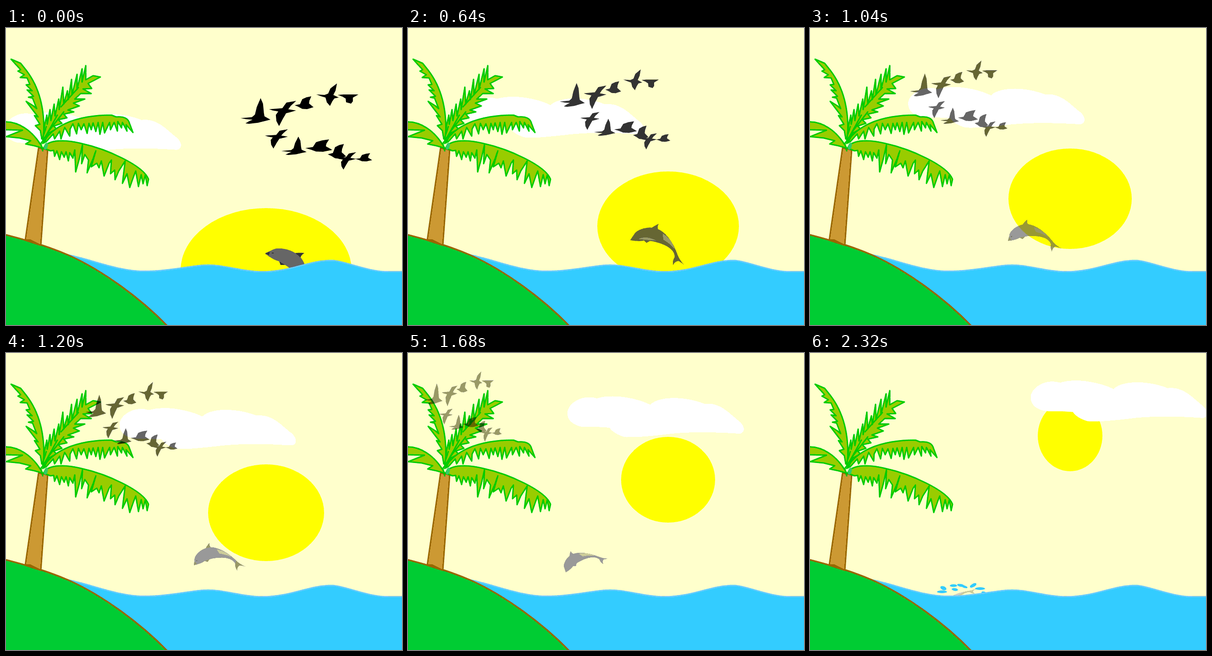
An HTML page with a canvas for the animation above (2400 ms loop, 864x648 px).

```html
<!DOCTYPE html>
<html lang="en">
<head>
<meta charset="utf-8">
<title>Island sunrise</title>
<style>
html, body { margin: 0; width: 100%; height: 100%; overflow: hidden; background: #ffc; }
canvas { display: block; width: 864px; height: 648px; }
</style>
</head>
<body>
<canvas id="stage" width="864" height="648"></canvas>
<script>
const W = 864, H = 648, STEP = 80, STEPS = 30;
const ctx = document.getElementById('stage').getContext('2d', { willReadFrequently: true });
const P = d => new Path2D(d);

function paint(c, path, fill, stroke, width) {
  if (fill) { c.fillStyle = fill; c.fill(path); }
  if (stroke) {
    c.strokeStyle = stroke;
    c.lineWidth = width;
    c.lineJoin = c.lineCap = 'round';
    c.stroke(path);
  }
}

const cloud = P('M281 148C281 128 312 106 345 116C378 106 430 114 462 130C475 114 530 108 580 128' +
  'C615 124 635 150 656 166C672 180 666 193 656 193C600 189 540 189 500 194C460 199 420 202 405 200' +
  'C390 196 378 188 373 180C340 177 320 180 308 177C290 172 281 162 281 148Z');

const surface = 'M135 495C190 506 245 531 305 531C350 531 400 520 425 518C470 513 510 532 560 532' +
  'C620 532 660 507 712 507C745 510 790 532 835 532L870 532';
const sea = P(surface + 'L870 660L100 660Z');
const seaLine = P(surface);

const slope = 'M-5 450C45 463 85 474 135 495C210 528 295 591 352 650';
const hill = P(slope + 'L-5 660Z');
const hillLine = P(slope);

const trunk = P('M71 262L91 266L76 474L54 463L42 463Z');
const trunkFoot = P('M42 463L54 467L76 474');

const fronds = [
  // left
  'M-5 205C25 203 58 222 80 262L62 257L43 253L54 246L30 240L0 237L36 223L-5 222',
  // upper left
  'M11 68L32 77L44 92C72 128 86 175 82 240L78 242L75 224L64 213L74 210L62 191L70 194L44 160L60 170' +
  'L67 176L58 153L49 151L60 149L46 135L57 137L44 124L52 123L46 109L31 108L40 102L26 94L32 91L20 78Z',
  // upper right
  'M80 244L84 214L89 190L90 210L96 178L98 202L105 166L107 192L115 155L116 178L124 129L126 166L134 137' +
  'L136 156L143 112L144 146L155 101L155 134L166 89L166 118L174 82L174 113L190 104L206 107L179 121' +
  'L187 132L168 133L186 143L163 143L150 155L172 155L147 164L160 170L135 179L148 183L126 188' +
  'L133 196L114 200L122 208L104 214L110 220L94 229Z',
  // middle right
  'M80 252C100 215 150 190 230 190L240 194Q262 192 268 204L277 228L262 211L264 225L254 206L252 218' +
  'L244 204L243 225L236 206L228 222L226 206L215 229L211 206L205 232L201 206L196 226L190 207L186 222' +
  'L181 208L177 230L170 209L164 222L158 208L154 231L146 209L140 220L139 236L128 217L120 242L117 225' +
  'L106 242L103 231L88 248Z',
  // lower right
  'M82 262C90 244 125 242 165 252C220 264 300 300 311 330L308 344L304 320L299 340L295 320L289 346' +
  'L283 312L278 325L270 348L264 318L254 339L260 290L246 312L238 331L237 310L228 318L230 288L225 295' +
  'L214 323L208 290L203 305L198 295L186 303L196 268L190 285L177 316L180 288L172 276L165 296L167 254' +
  'L160 285L152 314L150 266L146 284L139 272L136 290L131 270L127 282L121 270L117 287L111 268L106 280' +
  'L104 267L97 268Z'
].map(P);
const ribs = P('M80 268L76 252L82 244L100 212L112 190M84 250L94 224L126 183M80 240L88 215M120 172L158 130');

// Bird outlines in a 100 x 100 box
const soar = 'M0 78L38 74 48 64 54 35 67 0 75 22 78 58 80 71 100 84 78 90 58 96 28 100 16 98 28 90 40 84 20 82Z';
const cross = 'M0 33L27 31 49 29 64 7 100 0 80 20 71 33 100 38 78 45 63 49 51 71 37 100 27 80 25 56 34 42 14 38Z';
const reach = 'M0 49L37 51 53 45 63 22 92 0 86 31 76 51 100 63 80 67 71 80 61 100 47 84 41 63 22 57Z';
const fold = 'M0 70L28 62 40 22 62 8 88 0 78 35 76 56 100 85 66 100 40 98 20 82Z';
const dip = 'M0 10L27 5 100 5 73 38 73 76 64 100 40 86 38 48 24 29Z';

const flock = new Path2D();
[
  [soar, 512, 153, 65, 56], [cross, 574, 159, 59, 55], [fold, 630, 149, 41, 28],
  [reach, 677, 121, 49, 49], [dip, 724, 144, 45, 21], [cross, 565, 221, 50, 42],
  [soar, 601, 237, 55, 40], [fold, 653, 243, 59, 27], [fold, 702, 253, 40, 32],
  [cross, 720, 271, 44, 38], [fold, 762, 273, 37, 18]
].forEach(([shape, x, y, w, h]) =>
  flock.addPath(P(shape), new DOMMatrix([w / 100, 0, 0, h / 100, x, y])));

// Dolphin, drawn once with the nose at (0, 0)
const PAD = 20, ZOOM = 2;
const dolphin = document.createElement('canvas');
dolphin.width = dolphin.height = 150 * ZOOM;
{
  const c = dolphin.getContext('2d');
  const grey = v => `rgb(${v},${v},${v})`;
  c.scale(ZOOM, ZOOM);
  c.translate(PAD, PAD);
  paint(c, P('M0 0C6 -4 12 -5 18 -9C30 -14 52 -10 66 -1Q78 -2 86 -1Q78 4 78 9C92 26 96 55 90 88' +
    'Q88 100 92 116Q88 106 84 101Q74 98 66 104Q72 92 80 89Q86 80 82 68C78 56 68 44 50 29' +
    'L44 25L34 25L31 17Q18 14 0 0Z'), grey(92));
  paint(c, P('M20 7Q42 7 60 32Q44 24 20 7Z'), grey(97));
  paint(c, P('M83 25Q95 44 91 70Q86 52 77 38Z'), grey(140));
  paint(c, P('M66 -1Q78 -2 86 -1Q78 4 78 9ZM90 86Q88 100 92 116Q88 106 84 101Q74 98 66 104' +
    'Q72 92 80 89ZM0 0L11 -4L9 4ZM31 17L44 25L34 25Z'), grey(70));
  paint(c, P('M16 -1h2'), null, grey(40), 2);
}

// Dolphin centre: step, x, y
const leap = [
  [0, 625, 537], [4, 598, 485], [8, 548, 474], [13, 489, 458],
  [17, 437, 446], [21, 384, 454], [25, 351, 491], [29, 325, 537]
];

function along(keys, n) {
  let i = 0;
  while (i < keys.length - 2 && n > keys[i + 1][0]) i++;
  const a = keys[i], b = keys[i + 1];
  const before = keys[i - 1] || a, after = keys[i + 2] || b;
  const d = b[0] - a[0], u = (n - a[0]) / d;
  return [1, 2].map(k => {
    const m0 = (b[k] - before[k]) / (b[0] - before[0]) * d;
    const m1 = (after[k] - a[k]) / (after[0] - a[0]) * d;
    const e = b[k] - a[k];
    return a[k] + u * (m0 + u * (3 * e - 2 * m0 - m1 + u * (m0 + m1 - 2 * e)));
  });
}

// Splash drops: x, y, rx, ry, tilt
const drops = [
  [288, 521, 11, 3, 0], [291, 513, 7, 4, .4], [313, 507.5, 8, 3, 0],
  [316, 516, 7, 3, .15], [329, 507, 8, 3, .2], [337, 510, 7, 2.5, .3],
  [356, 507, 8, 3.5, -.5], [371, 514, 11, 3, 0], [379, 523, 5, 2.5, .2]
];

function drawSun(n) {
  ctx.fillStyle = '#ff0';
  ctx.beginPath();
  ctx.ellipse(567.5, 528.5 - 12 * n, 186.5 - 4 * n, 135.5 - 2 * n, 0, 0, 7);
  ctx.fill();
}

function drawCloud(n) {
  ctx.save();
  ctx.translate(16.71 * (n - 17), -4.28 * (n - 17));
  paint(ctx, cloud, '#fff');
  ctx.restore();
}

function drawDolphin(n) {
  ctx.save();
  ctx.globalAlpha = 1 - .0245 * n;
  ctx.translate(...along(leap, n));
  ctx.rotate(-3.63 * n * Math.PI / 180);
  ctx.scale(1 - .021 * n, 1 - .013 * n);
  ctx.drawImage(dolphin, -60 - PAD, -45 - PAD, 150, 150);
  ctx.restore();
}

function drawSplash(n) {
  const k = Math.min(1, (n - 25) / 4);
  if (k <= 0) return;
  ctx.fillStyle = '#3cf';
  for (const [x, y, rx, ry, tilt] of drops) {
    ctx.beginPath();
    ctx.ellipse(332 + (x - 332) * k, 528 + (y - 528) * k, rx, ry, tilt, 0, 7);
    ctx.fill();
  }
}

function drawPalm() {
  paint(ctx, trunk, '#c93', '#960', 3);
  paint(ctx, trunkFoot, null, '#960', 3);
  fronds.forEach(f => paint(ctx, f, '#9c0', '#0c0', 3));
  paint(ctx, ribs, null, '#0c0', 3);
  ctx.fillStyle = '#3c6';
  ctx.beginPath();
  ctx.ellipse(87, 258, 4, 8, .3, 0, 7);
  ctx.fill();
}

function drawBirds(n) {
  ctx.save();
  ctx.globalAlpha = 1 - .0245 * n;
  ctx.translate(512 - 22.6 * n, 121 - 3.85 * n);
  ctx.scale(1 - .0199 * n, 1 - .0088 * n);
  ctx.translate(-512, -121);
  paint(ctx, flock, '#000');
  ctx.restore();
}

// Snap every channel to the web-safe palette
function snap() {
  const img = ctx.getImageData(0, 0, W, H), d = img.data;
  for (let i = 0; i < d.length; i++) d[i] = Math.round(d[i] / 51) * 51;
  ctx.putImageData(img, 0, 0);
}

function draw(n) {
  ctx.fillStyle = '#ffc';
  ctx.fillRect(0, 0, W, H);
  drawSun(n);
  drawCloud(n);
  drawDolphin(n);
  drawSplash(n);
  paint(ctx, sea, '#3cf');
  paint(ctx, seaLine, null, '#6cf', 3);
  paint(ctx, hill, '#0c3');
  paint(ctx, hillLine, null, '#960', 3.5);
  drawPalm();
  drawBirds(n);
  snap();
}

let start, shown = -1;
function tick(now) {
  start ??= now;
  const n = Math.floor((now - start) / STEP) % STEPS;
  if (n !== shown) draw(shown = n);
  requestAnimationFrame(tick);
}
requestAnimationFrame(tick);
</script>
</body>
</html>
```
